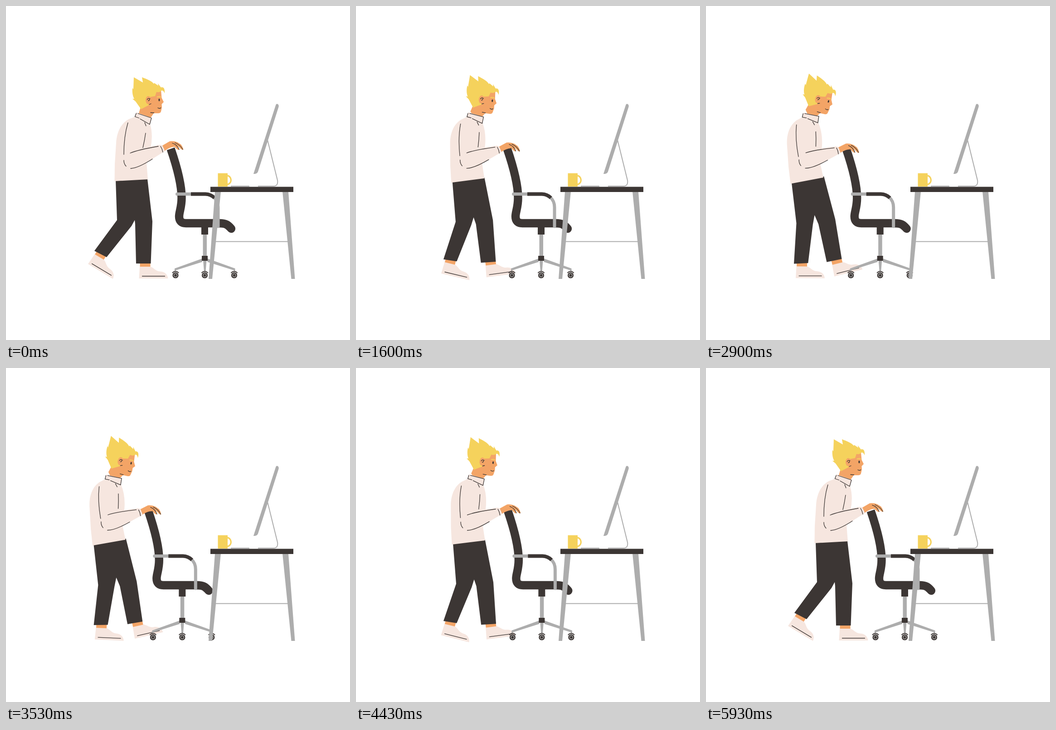
An HTML page for the animation above (6010 ms loop, 759x738 px).

```html
<!DOCTYPE html>
<html lang="en">
<head>
<meta charset="utf-8">
<title>Chair push</title>
<style>
  html, body { margin: 0; width: 100%; height: 100%; overflow: hidden; background: #fff; }
  svg { display: block; width: 759px; height: 738px; }
  .dark { fill: #3c3634; }
  .gray { fill: #adadad; }
  .pink { fill: #f6e6df; }
  .gold { fill: #f5d25c; }
  .skin { fill: #f3a466; }
  .ink, .bar { fill: none; stroke: #3c3634; }
  .ink { stroke-width: 1.3; stroke-linecap: round; stroke-linejoin: round; }
  .metal { fill: none; stroke: #adadad; }
</style>
</head>
<body>
<svg viewBox="0 0 759 738">
  <defs>
    <g id="shoe">
      <path class="skin" d="M2-36H25V-24H2Z"/>
      <path class="pink" d="M0 0 1.5-26H24.5C32-25 36-16 46-15.5C58-15 63-8 64 0Z"/>
      <path class="ink" d="M7-5H57"/>
    </g>
    <g id="caster">
      <circle class="dark" r="6.6"/>
      <circle class="metal" r="3.6" stroke-width="1.3"/>
      <path class="bar" stroke-width="2" d="M-7-5A8.6 8.6 0 0 1 7-5"/>
    </g>
  </defs>

  <use id="backShoe" href="#shoe"/>
  <use id="frontShoe" href="#shoe"/>
  <path id="trousers" class="dark"/>

  <g id="chair">
    <path class="bar" stroke-width="18.4" d="M363.5 315.5C376 352 387.5 392 387.5 424C387.5 445 382 455 382 465Q382 480 397 480H472"/>
    <path class="bar" stroke-width="18.4" stroke-linecap="round" d="M470 480C486 480 490 484 497 492"/>
    <path class="metal" stroke-width="7" stroke-linecap="round" d="M377.5 415.5H408M459 423Q468 431 468 445V487"/>
    <path class="bar" stroke-width="8" d="M408 415.5H440Q452 416 460 424"/>
    <path class="gray" d="M434.5 504H443V553H434.5Z
      M433 558V565.5L374.5 584V587H372V580Z M444.5 558V565.5L503 584V587H505.5V580Z
      M435 562H442.5L440.5 587H437Z"/>
    <path class="dark" d="M431 487H446V505H431ZM432 552H445V563H432Z"/>
    <use href="#caster" x="374" y="595"/>
    <use href="#caster" x="438.5" y="595"/>
    <use href="#caster" x="503.5" y="595"/>
  </g>

  <g id="head">
    <path class="skin" d="M298 220 293 237 303 250 319 247 326 237H334Q341 237.5 342 233L344 224 343.5 217 348 212 343.5 203 342 186H312Z"/>
    <path class="gold" d="M282 157.5 302 169 300 157.5C312 162 322 166 326 172L327 170 336 176 335 171 342 180C347 178 351 182 350 193C348 188 346 186 343 187C340 190 337 191 332 190L329 199 318 201 315 219 298 228 286 211 279 205 283 205C280 200 278 192 279 181L281 184Z"/>
    <ellipse class="skin" cx="314" cy="208" rx="6" ry="9"/>
    <path class="ink" d="M311.5 207Q313 202.5 318 205M314 209.5Q317 209 316.5 206M316 217.5 320 216M335 225Q339 227.5 341.5 225M319 235.5 326.5 236"/>
    <path fill="none" stroke="#f5d25c" stroke-width="2" d="M333 201.5Q338 199 342 201.5"/>
    <ellipse class="dark" cx="338" cy="207.5" rx="1.6" ry="2.9"/>
  </g>

  <g id="torso">
    <path class="pink" d="M288 235 321 247 318 261Q325 285 319 315L310 346 313 383 239.5 387 240 350 243 303C244 282 252 260 271 250L284 245Z"/>
    <path class="ink" d="M287.5 237 284.5 244.5 293.5 247.5M291 237.5 321 247.5 317 261.5 296 249.5M306 257.5 309 265"/>
  </g>

  <path id="upperArm" class="ink" d="M269 258Q260 288 260 328M308 281Q306 296 302 313"/>

  <g id="forearm">
    <path class="skin" d="M344 309 361 299Q369 297.5 378 301L386 306Q390 311 391.5 317Q389 319 385 315L379 309.5 382.5 317.5Q379 319.5 372 311L366 312Q358 314 349 321Z"/>
    <path class="ink" d="M367 303Q377 306 382 317M373 302Q385 307 390 317"/>
    <path class="pink" d="M262 332 274 325 302 314 340 306.5 345 308 351 320.5 345 324 318 341 290 355 275 358Z"/>
    <path class="ink" d="M274 325Q290 318 336 310M260 341Q260 349 265 354M275 359Q292 358 323 338M341 310Q345 316 346 323"/>
  </g>

  <g id="desk">
    <path class="metal" stroke-width="1.8" d="M462 520.5H623"/>
    <path class="gray" d="M461 410H474L455 603H447ZM610 410H623L637.5 603H629.5Z"/>
    <path class="dark" d="M451 399.5H634V411H451Z"/>
    <path class="metal" stroke-width="2" d="M577 296 599 385Q601 398 590 398H556M496 398H537"/>
    <path class="gray" d="M595.5 218Q597 215 600 217Q602.5 219 601.5 223L556 366Q554 371.5 546 371Z"/>
    <path class="gold" d="M467.5 369.5H489V399H467.5Z"/>
    <ellipse cx="488" cy="384.5" rx="8.4" ry="9.6" fill="none" stroke="#f5d25c" stroke-width="3.2"/>
  </g>
</svg>

<script>
  const LOOP = 6010, STEP = 50, COUNT = 120;
  const part = id => document.getElementById(id);

  // Pivot, then travel and turn over one full push.
  const limbs = {
    chair: [0, 0, -54.5, 0, 0],
    head: [315, 208, -67.5, -2, 13.2],
    torso: [242, 386, -53.3, 5.4, -7.6],
    upperArm: [269, 258, -69.6, 4.4, -10.9],
    forearm: [343, 317, -53.6, 3.8, 3.6]
  };

  // Trouser outline: start, travel, optional bow midway.
  const outline = [
    [242, 385, -53.3, 5.4],
    [312, 382, -52, -5.4],
    [323, 476, -38, -5],
    [319.5, 569, -20, -10, 0, 6],
    [287, 569, -20.7, -3.3],
    [285, 482, -37, 0],
    [284, 473, -44.6, -11],
    [277, 486, -41.4, -3],
    [222, 555, 3.3, 13, -6, 8],
    [195, 541, -1, 28.5, -6, 12],
    [245, 473, -45.7, 7]
  ];

  const smooth = p => p * p * (3 - 2 * p);
  const bend = (start, travel, bow, p) => start + travel * p + bow * p * (1 - p);

  function place(id, x, y, turn, px = 0, py = 0) {
    part(id).setAttribute("transform",
      `translate(${x} ${y}) rotate(${turn}) translate(${-px} ${-py})`);
  }

  function pose(p) {
    for (const [id, [x, y, dx, dy, turn]] of Object.entries(limbs))
      place(id, x + dx * p, y + dy * p, turn * p, x, y);
    place("backShoe", bend(181, 17.1, -9.7, p), bend(570, 31.4, 15, p), bend(31, -31, -2, p));
    place("frontShoe", 293.5 - 10.3 * p, 602 - 4.4 * p, -14.2 * p);
    const points = outline.map(([x, y, dx, dy, bx = 0, by = 0]) =>
      `${bend(x, dx, bx, p)} ${bend(y, dy, by, p)}`);
    part("trousers").setAttribute("d", `M${points.join("L")}Z`);
  }

  function tick() {
    const time = performance.now() % LOOP;
    const step = Math.min(Math.floor((time + 20) / STEP), COUNT - 1);
    const half = COUNT / 2;
    pose(smooth(1 - Math.abs(step - half) / half));
    requestAnimationFrame(tick);
  }
  tick();
</script>
</body>
</html>
```
